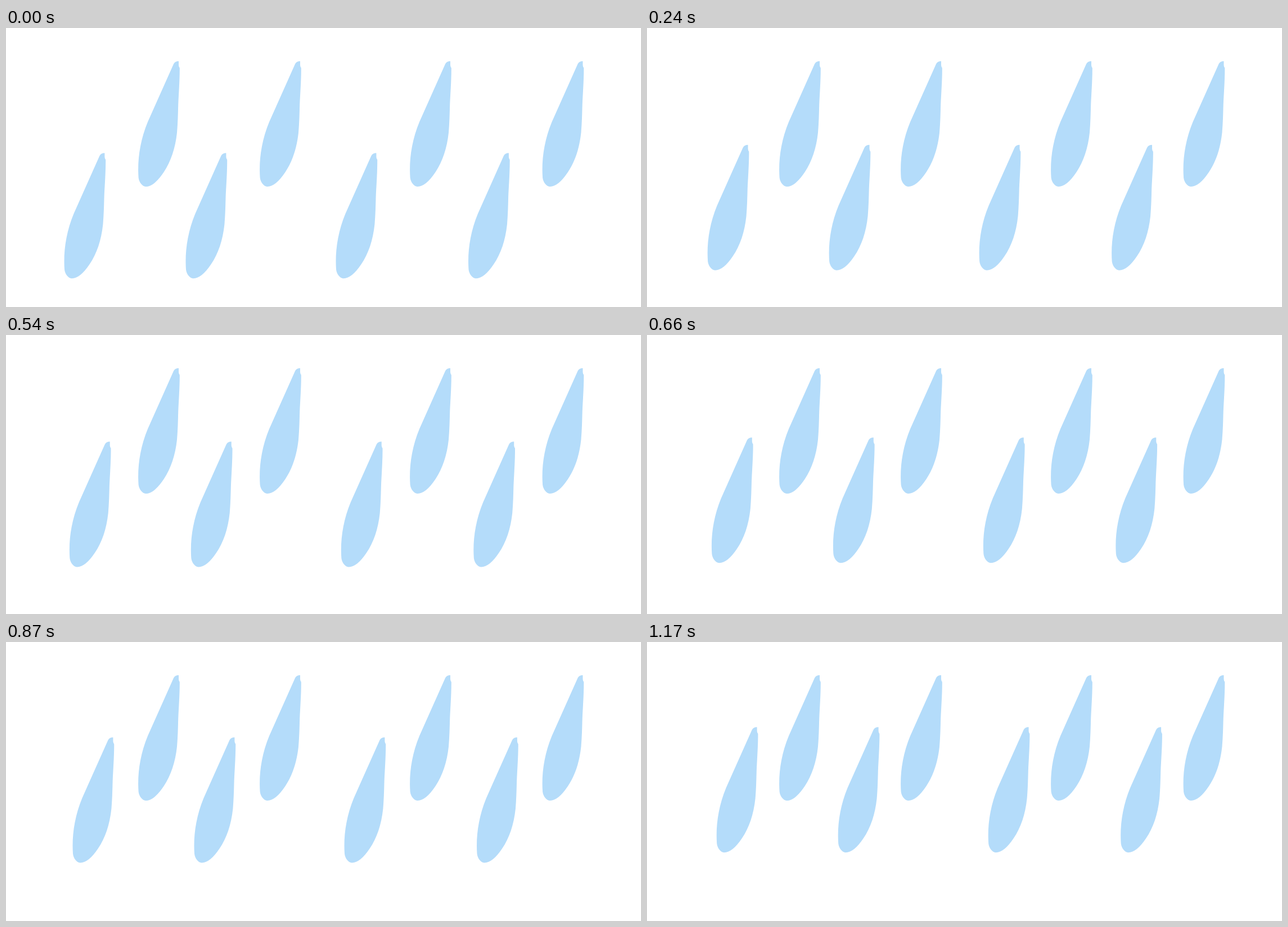
Write an HTML page that moves like this. It is 1129x496 px and loops after 4.87 s.

```html
<!DOCTYPE html>
<html lang="en">
<head>
<meta charset="utf-8">
<title>Raindrops</title>
<style>
  html, body { margin: 0; width: 100%; height: 100%; overflow: hidden; background: #fff; }
  svg { display: block; width: 100%; height: 100%; }
</style>
</head>
<body>
<svg viewBox="0 0 1129 496" fill="#b4dcfa">
  <defs>
    <path id="drop" d="M298 64Q300.500 59 307 59L307 66Q307.200 69 308.800 71C309 92 307 118 306.200 137
      C305.800 152 305.500 168 304 186C301 214 293 238 280 257C269 273 259 282 248.500 282
      C242 281.500 236.500 274 235.600 266C233.500 235 238 201 252 167Z"/>
    <g id="row">
      <use href="#drop"/>
      <use href="#drop" x="216"/>
      <use href="#drop" x="483"/>
      <use href="#drop" x="718.5"/>
    </g>
  </defs>
  <use href="#row"/>
  <use href="#row" id="lower"/>
</svg>
<script>
  const LOOP = 4870, STEP = 30, STEPS = 39;
  const from = { x: -131.6, y: 163.2 };
  const to = { x: -111.4, y: 92.2 };
  const lower = document.getElementById('lower');
  const mix = (a, b, k) => a + (b - a) * k;

  // The lower row rises in even steps, then rests until the loop ends.
  function render(ms) {
    const k = Math.min(Math.floor((ms % LOOP) / STEP), STEPS) / STEPS;
    lower.setAttribute('transform', `translate(${mix(from.x, to.x, k)} ${mix(from.y, to.y, k)})`);
  }

  function tick() {
    render(performance.now());
    requestAnimationFrame(tick);
  }
  tick();
</script>
</body>
</html>
```
